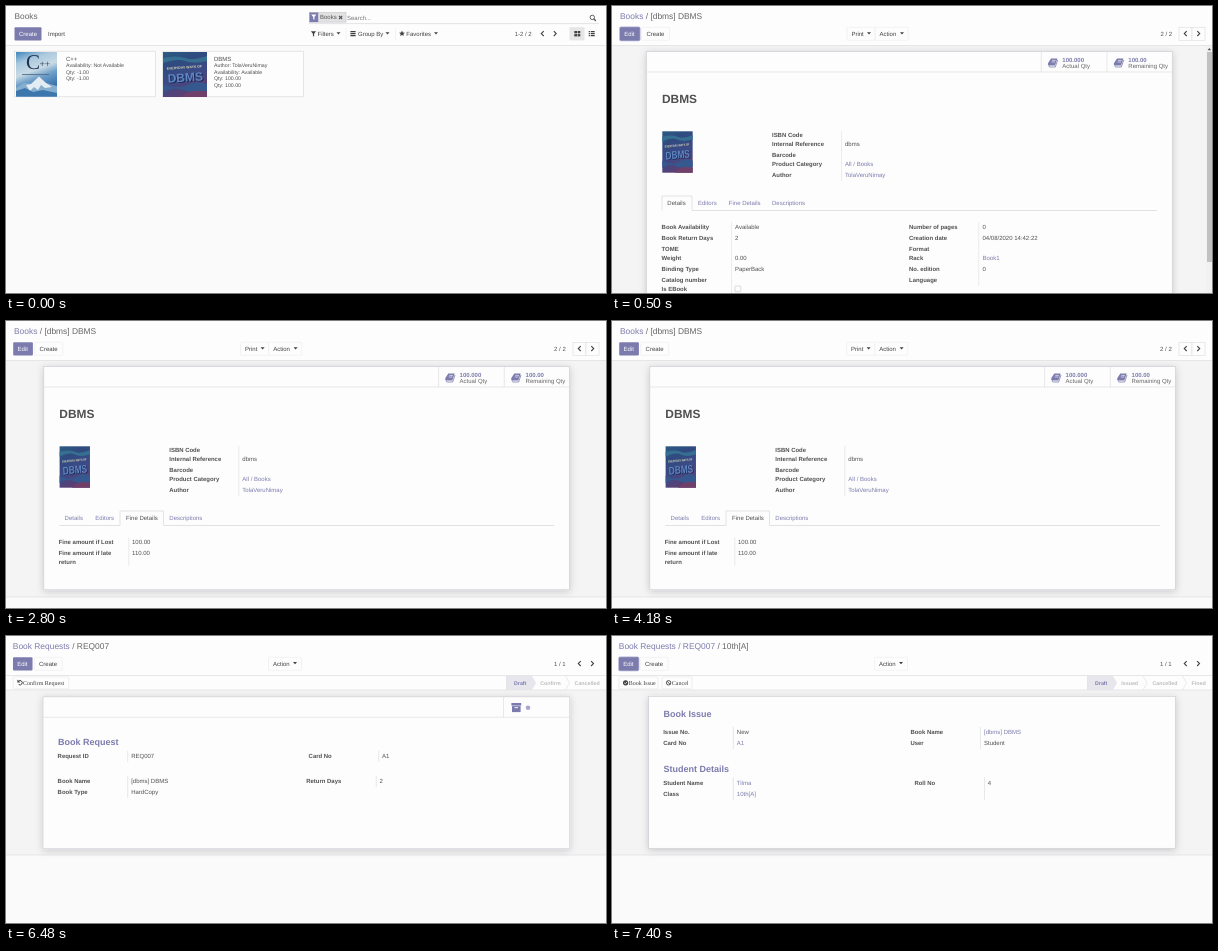
Animation of 600x287 px, one loop 8000 ms. Source, as an HTML page:

```html
<!DOCTYPE html>
<html lang="en">
<head>
<meta charset="utf-8">
<title>Library screens</title>
<style>
html, body { margin: 0; width: 100%; height: 100%; overflow: hidden; background: #fdfdfd; }
svg { display: block; width: 100vw; height: 100vh; }
text { font-family: "Liberation Sans", Arial, sans-serif; text-rendering: geometricPrecision; white-space: pre; }
.serif { font-family: "Liberation Serif", Times, serif; }
</style>
</head>
<body>
<svg id="stage" viewBox="0 0 600 287">
  <defs>
    <linearGradient id="sky" x2=".35" y2="1">
      <stop offset="0" stop-color="#3f86bd"/><stop offset=".25" stop-color="#a9c8de"/>
      <stop offset=".5" stop-color="#c9dae5"/><stop offset=".68" stop-color="#6fa0c9"/>
      <stop offset="1" stop-color="#2f6ca6"/>
    </linearGradient>
    <linearGradient id="cover" x2=".4" y2="1">
      <stop offset="0" stop-color="#2c5c82"/><stop offset=".3" stop-color="#2f4b80"/>
      <stop offset=".65" stop-color="#3d4a86"/><stop offset="1" stop-color="#5c3f72"/>
    </linearGradient>
    <filter id="shadow" x="-5%" y="-10%" width="110%" height="120%">
      <feDropShadow dx="0" dy="1.5" stdDeviation="3.5" flood-color="#000" flood-opacity=".18"/>
    </filter>
  </defs>
</svg>
<script>
const LOOP = 8000;
const PURPLE = '#7c7bad', INK = '#505050', DARK = '#404040', RULE = '#dedee0';
const WHITE = '#fdfdfd', PALE = '#fafafa', GREY = '#f4f4f5';
const AUTHOR = 'TolaVeruNimay', STUDENT = 'Tilma';

// Shape helpers; text y is the vertical middle of the line.
const rect = (x, y, w, h, fill, extra = '') =>
  `<rect x="${x}" y="${y}" width="${w}" height="${h}" fill="${fill}" ${extra}/>`;
const path = (d, fill, extra = '') => `<path d="${d}" fill="${fill}" ${extra}/>`;
const line = (d, color = RULE, w = 0.7) => path(d, 'none', `stroke="${color}" stroke-width="${w}"`);
const text = (x, y, s, { size = 6, fill = INK, bold, extra = '' } = {}) =>
  `<text x="${x}" y="${y + size * 0.3}" font-size="${size}" fill="${fill}"${bold ? ' font-weight="700"' : ''} ${extra}>${s}</text>`;
const link = (x, y, s) => text(x, y, s, { fill: PURPLE });
const label = (x, y, s) => text(x, y, s, { bold: true, size: 5.96 });
const field = (x, vx, y, name, value = '', isLink) =>
  label(x, y, name) + (isLink ? link : text)(vx, y, value);
const at = (x, y, s) => `<g transform="translate(${x} ${y})">${s}</g>`;

const caret = (x, y) => path(`M${x - 2} ${y - 1}h4l-2 2.2z`, DARK);
const chevron = (x, y, dir) => line(`M${x - dir * 1.2} ${y - 2.4}l${dir * 2.4} 2.4l${-dir * 2.4} 2.4`, DARK, 1.1);
const funnel = (x, y, fill) => path(`M${x - 2.6} ${y - 2.6}h5.2l-2 2.5v3l-1.2 -1v-2z`, fill);
const bars = (x, y, w = 5.2) => line(`M${x} ${y - 2}h${w}m${-w} 2h${w}m${-w} 2h${w}`, DARK, 1.1);

function star(x, y, r) {
  const pts = Array.from({ length: 10 }, (_, i) => {
    const a = i * Math.PI / 5, q = i % 2 ? r * 0.45 : r;
    return `${x + q * Math.sin(a)},${y - q * Math.cos(a)}`;
  });
  return `<polygon points="${pts.join(' ')}" fill="${DARK}"/>`;
}

const book = (x, y) => at(x, y,
  path('M-2 -4h6.4l-2.4 7h-6.4q-1.2 -1 -.5 -2.6z', PURPLE) +
  line('M-1 -2.1h3.6m-4.1 1.6h3.6', '#fff', 0.6) +
  line('M-4 3q-.4 1.5 1 1.5h5.3l2.4 -7', PURPLE, 0.8));

const button = (x, w, s, tx, y = 27.8) =>
  rect(x, y - 6.5, w, 13, WHITE, 'stroke="#ebebed" stroke-width=".6" rx="1"') + text(tx, y, s, { fill: DARK });
const primary = (x, w, s, tx, focus) =>
  (focus ? rect(x - 0.8, 20.4, w + 1.6, 14.8, '#b3b2d2', 'rx="2"') : '') +
  rect(x, 21.2, w, 13.2, PURPLE, 'rx="1"') + text(tx, 27.8, s, { fill: '#fff' });

const header = (bottom = 39.5) => rect(0, 0, 600, bottom, WHITE) + line(`M0 ${bottom}H600`);

function crumbs(x, trail, here) {
  return `<text x="${x}" y="12.7" font-size="8.42" fill="#666"><tspan fill="${PURPLE}">${trail}</tspan> / ${here}</text>`;
}

const pager = (x, s, left, right, boxed) => text(x, 27.8, s) +
  (boxed ? [left, right].map(c => rect(c - 6.5, 21.3, 13, 13, WHITE, 'stroke="#dedee2" stroke-width=".6"')).join('') : '') +
  chevron(left, 27.6, -1) + chevron(right, 27.6, 1);

const sheet = (x, y, w, h) =>
  rect(x, y, w, h, WHITE, 'stroke="#cdcdd5" stroke-width=".7" filter="url(#shadow)"');

// Book covers
const cppCover = at(10, 46,
  rect(0, 0, 41, 44.5, 'url(#sky)') +
  path('M0 36L8 31L15 32L23 24.5L30 31L41 34V44.5H0z', '#86aece') +
  path('M10 33l5 -1l8 -7.5l7 6.5l6 4l-7 1l-4 -3l-3 5l-4 -3l-4 4z', '#e3ecf2') +
  path('M0 39l9 -3l8 4l10 -2l14 3v3.5H0z', '#3b77ad') +
  rect(6, 22, 27, 0.9, '#54718d') +
  text(10, 10.8, 'C', { size: 21, fill: '#1d3350', extra: 'class="serif"' }) +
  text(23.5, 12.6, '++', { size: 9.5, fill: '#1d3350', extra: 'class="serif"' }));

const dbmsCover = (x, y, sx, sy) => `<g transform="translate(${x} ${y}) scale(${sx} ${sy})">` +
  rect(0, 0, 44, 45, 'url(#cover)') +
  path('M0 6Q14 3 22 6T44 4V9Q30 12 22 9T0 11z', '#376f91') +
  path('M0 32Q14 38 24 33T44 32V39Q30 42 20 38T0 40z', '#35598f') +
  path('M18 45Q28 36 44 40V45z', '#70406a') +
  `<g transform="rotate(-4 22 22)">` +
  text(4, 15.5, 'EVERYDAY WAYS OF', { size: 3.5, fill: '#d8d6b4', bold: true }) +
  text(5.3, 26.8, 'DBMS', { size: 12, fill: '#1a2450', bold: true }) +
  text(4.4, 26, 'DBMS', { size: 12, fill: '#5d88c4', bold: true }) + '</g></g>';

// Screens
function list() {
  const small = { size: 5.22 };
  const card = (x, cover, title, rows) =>
    rect(x, 45.2, 141, 45.6, WHITE, 'stroke="#dcdcdf" stroke-width=".7"') + cover +
    text(x + 51.5, 53, title) + rows.map((s, i) => text(x + 51.5, 59.5 + i * 6.7, s, small)).join('');
  return rect(0, 0, 600, 287, PALE) + header() +
    text(8.5, 10.4, 'Books', { size: 8.3, fill: '#666' }) +
    primary(8.5, 27, 'Create', 13) + text(42, 27.8, 'Import', { fill: DARK }) +
    line('M303 17.6H593', '#dadadd') +
    rect(303.5, 6.5, 36.5, 9.6, '#e2e2e3', 'stroke="#b9b9c4" stroke-width=".5"') +
    rect(303.5, 6.5, 8.7, 9.6, PURPLE) + funnel(307.8, 11.2, '#fff') +
    text(314, 11.2, 'Books') + line('M333 9.8l3.2 3.2m0 -3.2l-3.2 3.2', INK, 1.1) +
    text(341, 11.8, 'Search...', { fill: '#777' }) +
    `<circle cx="586.3" cy="11.4" r="2.2" fill="none" stroke="${INK}" stroke-width=".9"/>` + line('M587.9 13l2 2', INK, 1.2) +
    funnel(307.5, 27.8, DARK) + text(311.5, 27.8, 'Filters', { fill: DARK }) + caret(332.5, 27.3) +
    line('M340 22v12M389.5 22v12', '#ececee') +
    bars(344.4, 27.6) + text(352, 27.8, 'Group By', { fill: DARK }) + caret(381.5, 27.3) +
    star(396, 27.6, 3.1) + text(400.3, 27.8, 'Favorites', { fill: DARK }) + caret(430, 27.3) +
    pager(508.7, '1-2 / 2', 536.5, 549) +
    rect(563.5, 21.2, 15, 13.2, '#e6e6e8') +
    [568.3, 571.6].map(x => rect(x, 25, 2.7, 2.3, DARK) + rect(x, 28.1, 2.7, 2.3, DARK)).join('') +
    bars(582.7, 27.6, 1.2) + bars(584.7, 27.6, 4) +
    card(8.5, cppCover, 'C++', ['Availability: Not Available', 'Qty: -1.00', 'Qty: -1.00']) +
    card(156.5, dbmsCover(157, 46, 1, 1), 'DBMS',
      ['Author: ' + AUTHOR, 'Availability: Available', 'Qty: 100.00', 'Qty: 100.00']);
}

const bookTop = (shift, focus) => header() + crumbs(8, 'Books', '[dbms] DBMS') +
  primary(8 - shift, 19.7, 'Edit', 12.3 - shift, focus) + button(29.5 - shift, 28, 'Create', 34.4 - shift) +
  button(235 - shift / 2, 28.2, 'Print', 239.4 - shift / 2) + caret(257 - shift / 2, 27.3) +
  button(263.2 - shift / 2, 33, 'Action', 267.6 - shift / 2) + caret(290 - shift / 2, 27.3) +
  pager(548.5 - shift / 2, '2 / 2', 573.5, 586.5, true);

// Everything the two tabs of the book form share, laid out from x = 34.5.
function bookSheet(active, height) {
  const tabs = [['Details', 55.3, 50, 30], ['Editors', 86], ['Fine Details', 116.8, 110.7, 43.5], ['Descriptions', 160]];
  const [, , tabX, tabW] = tabs[active];
  const stat = (x, n, s) => book(x, 56.5) + text(x + 9.3, 53.8, n, { fill: PURPLE, bold: true }) +
    text(x + 9.3, 60.4, s, { fill: '#666' });
  return sheet(34.5, 45.6, 525.8, height) + line('M34.5 66H560M429.3 46V66M495 46V66') +
    stat(441, '100.000', 'Actual Qty') + stat(507, '100.00', 'Remaining Qty') +
    text(50, 93.4, 'DBMS', { size: 11.9, bold: true }) +
    dbmsCover(50.3, 125.3, 0.69, 0.92) + line('M229.5 125V175', '#e4e4e6') +
    label(160, 129.4, 'ISBN Code') + field(160, 233, 138.4, 'Internal Reference', 'dbms') +
    label(160, 149.2, 'Barcode') + field(160, 233, 158, 'Product Category', 'All / Books', true) +
    field(160, 233, 169.2, 'Author', AUTHOR, true) +
    line(`M50 204.5H${tabX}V190H${tabX + tabW}V204.5H545`, '#d7d7db') +
    tabs.map(([s, x], i) => (i === active ? text : link)(x, 197.3, s)).join('');
}

function details() {
  const left = [[221.3, 'Book Availability', 'Available'], [232.3, 'Book Return Days', '2'], [243.5, 'TOME'],
    [252.3, 'Weight', '0.00'], [263.4, 'Binding Type', 'PaperBack'], [274.4, 'Catalog number'], [283.2, 'Is EBook']];
  const right = [[221.3, 'Number of pages', '0'], [232.3, 'Creation date', '04/08/2020 14:42:22'], [243.5, 'Format'],
    [252.3, 'Rack', 'Book1', true], [263.4, 'No. edition', '0'], [274.4, 'Language']];
  return rect(0, 0, 600, 287, GREY) + bookTop(0, true) + bookSheet(0, 260) +
    line('M119.5 216V287M366.7 216V280', '#e4e4e6') +
    left.map(([y, ...r]) => field(49.6, 123, y, ...r)).join('') +
    right.map(([y, ...r]) => field(297, 370.5, y, ...r)).join('') +
    rect(123, 280, 5.8, 5.8, WHITE, 'stroke="#c4c4c8" stroke-width=".6" rx=".8"') +
    rect(594.3, 40, 5.7, 247, '#f1f1f1') + rect(595, 46, 5, 210, '#c1c1c1') +
    path('M595.6 44.2h3.6l-1.8 -2.2z', '#555');
}

function fines() {
  return rect(0, 0, 600, 287, PALE) + rect(0, 39, 600, 237, GREY) + line('M0 276H600') + bookTop(0.8) +
    at(3.3, 0, bookSheet(2, 223.2)) + line('M122.8 216V245', '#e4e4e6') +
    field(52.7, 126, 221.3, 'Fine amount if Lost', '100.00') +
    field(52.7, 126, 232.4, 'Fine amount if late', '110.00') + label(52.7, 241, 'return');
}

// Status arrows: steps are [text, x], the first one is current.
function status(x0, steps, ends) {
  const arrow = x => line(`M${x} 40l4 7l-4 7`, '#e2e2e5');
  return path(`M${x0} 40H${ends[0]}l4 7l-4 7H${x0}z`, '#e6e6ec') + line(`M${x0} 40v14`) + ends.slice(1).map(arrow).join('') +
    steps.map(([s, x], i) => text(x, 47, s, { size: 5.3, bold: true, fill: i ? '#bcbcc0' : PURPLE })).join('');
}

const action = (x, w, s, icon) =>
  rect(x, 40.9, w, 12, WHITE, 'stroke="#e4e4e6" stroke-width=".6" rx="1"') + icon +
  text(x + 9.8, 47, s, { fill: DARK, extra: 'class="serif"' });

const requestTop = (trail, here, focus) =>
  rect(0, 0, 600, 287, PALE) + rect(0, 54, 600, 165, GREY) + line('M0 219H600') +
  header(54) + line('M0 39.5H600') + crumbs(6.8, trail, here) +
  primary(7, 19.5, 'Edit', 11.2, focus) + button(28.2, 28, 'Create', 33) +
  button(262.5, 33, 'Action', 267) + caret(289, 27) + pager(548, '1 / 1', 573.5, 586.3);

const heading = (x, y, s) => text(x, y, s, { size: 9, fill: PURPLE, bold: true });

function request() {
  const undo = line('M12.4 45.2a2.2 2.2 0 1 1 .3 3.3', DARK, 1) + path('M11.4 43.6v2.9h2.9z', DARK);
  return requestTop('Book Requests', 'REQ007') + action(7.2, 55.5, 'Confirm Request', undo) +
    status(500.5, [['Draft', 508], ['Confirm', 534.3], ['Cancelled', 568.6]], [526, 559.5]) +
    sheet(37, 60.8, 526.8, 152) + line('M37 81.2H564M497.5 61V81') +
    rect(505.4, 67, 9.8, 2.6, PURPLE) + rect(506, 70.1, 8.6, 6, PURPLE) + rect(508.6, 71.2, 3.4, 0.9, '#fff') +
    `<circle cx="522" cy="71.8" r="2.3" fill="#a9a8cb"/>` +
    heading(52, 106.4, 'Book Request') +
    line('M121.7 115V126M372.7 115V126M121.7 140V162M370.3 140V151', '#e0e0e3') +
    field(51.6, 125.2, 120.4, 'Request ID', 'REQ007') + field(302.6, 376, 120.4, 'Card No', 'A1') +
    field(51.6, 125.2, 145.4, 'Book Name', '[dbms] DBMS') + field(300.2, 373.6, 145.4, 'Return Days', '2') +
    field(51.6, 125.2, 156.3, 'Book Type', 'HardCopy');
}

function issue() {
  const check = `<circle cx="13.6" cy="46.8" r="2.6" fill="${DARK}"/>` + line('M12.2 46.8l1.1 1.1l1.8 -2.1', '#fff', 0.8);
  const ban = `<circle cx="56.6" cy="46.8" r="2.2" fill="none" stroke="${DARK}" stroke-width=".9"/>` + line('M55.1 45.3l3 3', DARK, 0.9);
  return requestTop('Book Requests / REQ007', '10th[A]', true) +
    action(7, 39, 'Book Issue', check) + action(50, 30, 'Cancel', ban) +
    status(475.5, [['Draft', 483], ['Issued', 509.3], ['Cancelled', 540.4], ['Fined', 579.5]], [501, 531, 570.5]) +
    sheet(36.6, 60.3, 527, 152) + heading(51.4, 78.4, 'Book Issue') +
    line('M121.3 91V113M368.5 91V113M121.3 141V164M372.5 141V164', '#e0e0e3') +
    field(51.2, 124.8, 96.6, 'Issue No.', 'New') + field(298.4, 372, 96.6, 'Book Name', '[dbms] DBMS', true) +
    field(51.2, 124.8, 107.6, 'Card No', 'A1', true) + field(298.4, 372, 107.6, 'User', 'Student') +
    heading(51.4, 133.2, 'Student Details') +
    field(51.2, 124.8, 147.2, 'Student Name', STUDENT, true) + field(302.4, 375.8, 147.2, 'Roll No', '4') +
    field(51.2, 124.8, 158.2, 'Class', '10th[A]', true);
}

const scenes = [[0, list], [500, details], [2800, fines], [5100, request], [7400, issue]];
const stage = document.getElementById('stage');

scenes.forEach(([start, draw], i) => {
  const end = i + 1 < scenes.length ? scenes[i + 1][0] : LOOP;
  const g = document.createElementNS('http://www.w3.org/2000/svg', 'g');
  g.innerHTML = draw();
  stage.append(g);
  const steps = [[0, start ? 0 : 1]];
  if (start) steps.push([start, 1]);
  if (end < LOOP) steps.push([end, 0]);
  steps.push([LOOP, end < LOOP ? 0 : 1]);
  g.animate(steps.map(([t, opacity]) => ({ offset: t / LOOP, opacity, easing: 'step-end' })),
    { duration: LOOP, iterations: Infinity });
});
</script>
</body>
</html>
```
